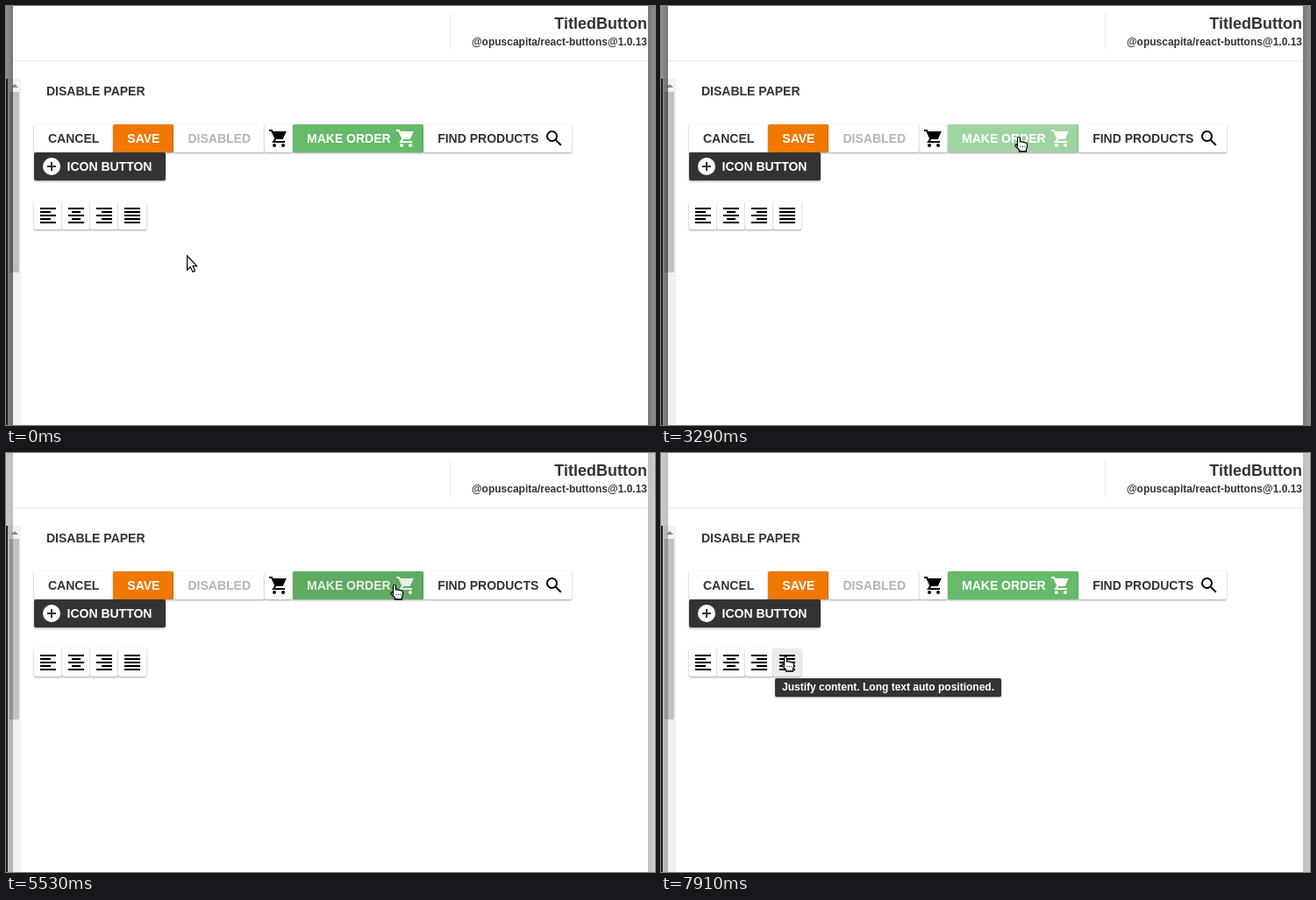
An HTML page that plays this animation: 740 by 478 pixels, repeating every 8 s.

```html
<!DOCTYPE html>
<html lang="en">
<head>
<meta charset="utf-8">
<title>TitledButton</title>
<style>
html, body { margin: 0; width: 100%; height: 100%; overflow: hidden; background: #fff; }
#stage {
  position: absolute; left: 0; top: 0; width: 740px; height: 478px; overflow: hidden;
  background: #fff; color: #333;
  font: bold 14px/32px "Liberation Sans", Arial, sans-serif; white-space: nowrap;
}
#stage > * { position: absolute; }
.head { right: 9px; text-align: right; }
.line { background: #eaeaea; }
.row { left: 32px; height: 32px; display: flex; }
.btn {
  position: relative; display: flex; gap: 5.5px; border-radius: 2px; background: #fff;
  box-shadow: 0 1px 3px rgba(0, 0, 0, .14), 0 1px 2px rgba(0, 0, 0, .26);
}
.btn svg { margin: 4px 0; width: 24px; height: 24px; fill: currentColor; stroke: currentColor; stroke-width: 0; }
.btn .o { fill: none; stroke-width: 2; }
.veil { position: absolute; inset: 0; border-radius: 2px; }
.side { top: 0; width: 8px; height: 478px; }
#tip {
  left: 130px; top: 257px; width: 258px; height: 21px; border-radius: 2px;
  background: #333; color: #fff; font-size: 12px; line-height: 20px; text-indent: 8px;
  box-shadow: 0 1px 2px rgba(0, 0, 0, .4);
}
#arrow, #hand { left: 0; top: 0; overflow: visible; stroke: #000; stroke-width: 1.2; fill: #fff; }
</style>
</head>
<body>
<div id="stage">
  <div class="head" style="top:4px;font-size:18px">TitledButton</div>
  <div class="head" style="top:25px;font-size:12px">@opuscapita/react-buttons@1.0.13</div>
  <div class="line" style="left:506px;top:8px;width:1px;height:42px"></div>
  <div class="line" style="left:8px;top:62px;width:724px;height:1px"></div>
  <div style="left:46px;top:81px">DISABLE PAPER</div>

  <div style="left:2px;top:83px;width:15px;height:395px;background:#f1f1f1"></div>
  <div style="left:4px;top:98px;width:11px;height:206px;background:#c1c1c1"></div>
  <svg style="left:6px;top:89px" width="8" height="5"><path d="M0 4L4 0L8 4Z" fill="#8a8a8a"/></svg>
  <div class="side" style="left:0"></div>
  <div class="side" style="left:732px"></div>
  <div style="left:0;top:83px;width:2px;height:395px;background:#1c1f24"></div>

  <div class="row" style="top:135px"></div>
  <div class="row" style="top:167px"></div>
  <div class="row" style="top:223px"></div>
  <div id="tip">Justify content. Long text auto positioned.</div>

  <svg id="arrow" width="14" height="21">
    <path d="M.6 1V17.2L4.3 13.7L6.9 19.3L9.5 18.1L7 12.6H11.7Z"/>
  </svg>
  <svg id="hand" width="16" height="18">
    <path d="M3.5 10.5V2a1.5 1.5 0 0 1 3 0V6q1.5-.8 2.6.3q1.5-.6 2.5.6q2.6-.3 2.9 1.6V12L13.5 14V17H5.5V15L1 10.6q-.3-1.9 1.3-1.8z"/>
    <path d="M6.5 11.5h1M9 11.5h1M11.5 11.5h1M5 16.8h9" fill="none"/>
  </svg>
</div>
<script>
const LOOP = 8000, STEP = 70, FOCUS_TIME = 4130;
const $ = id => document.getElementById(id);

// five text lines; every second one is short and starts at x
const lines = (x, w) => [0, 1, 2, 3, 4].map(i =>
  `<rect x="${i % 2 ? x : 3}" y="${3 + i * 4}" width="${i % 2 ? w : 18}" height="2"/>`).join("");

const icons = {
  cart: `<path d="M5 4H20.8L16.7 13H7.5z"/><path class="o" d="M1 3H4L8.4 12.4L6 16H19"/>
    <circle cx="7" cy="20" r="2"/><circle cx="17" cy="20" r="2"/>`,
  search: '<circle class="o" cx="9.5" cy="9.5" r="5.5"/><path class="o" d="M13.6 13.6L19.8 19.8"/>',
  add: '<circle cx="12" cy="12" r="10"/><path class="o" d="M7 12H17M12 7V17" style="stroke:#333"/>',
  left: lines(3, 12),
  center: lines(7, 10),
  right: lines(9, 12),
  justify: lines(3, 18)
};

// focus..blur: tinted; press..release: tinted more
const rows = [
  [
    { text: "CANCEL" },
    { text: "SAVE", bg: "#f07800", ink: "#fff" },
    { text: "DISABLED", ink: "#b5b5b5", off: true },
    { icon: "cart" },
    { text: "MAKE ORDER", icon: "cart", bg: "#66bb6a", ink: "#fff",
      focus: 5250, press: 5320, release: 5530, blur: 5880 },
    { text: "FIND PRODUCTS", icon: "search",
      focus: FOCUS_TIME, press: 4410, release: 4550, blur: 5250 }
  ],
  [{ text: "ICON BUTTON", icon: "add", first: true, bg: "#333", ink: "#fff",
     focus: 6650, press: 6650, release: 6790, blur: 7700 }],
  [
    { icon: "left" }, { icon: "center" }, { icon: "right" },
    { icon: "justify", focus: 7700, press: 7770, release: 7910, blur: LOOP }
  ]
];
const buttons = rows.flat();

rows.forEach((row, i) => {
  const rowEl = document.querySelectorAll(".row")[i];
  for (const b of row) {
    const el = document.createElement("div");
    const label = b.text ? `<span style="color:${b.ink || "#333"}">${b.text}</span>` : "";
    const icon = b.icon ? `<svg viewBox="0 0 24 24">${icons[b.icon]}</svg>` : "";
    const side = b.text ? 16 : 4;
    const padding = !label || !icon ? [side, side] : b.first ? [16, 8] : [8, 16];
    el.className = "btn";
    el.style.cssText = `padding:0 ${padding[0]}px 0 ${padding[1]}px;` +
      `background:${b.bg || "#fff"};color:${b.ink || "#000"}`;
    if (label && icon && !b.first) el.style.padding = "0 8px 0 16px";
    el.innerHTML = (b.first ? icon + label : label + icon) + '<div class="veil"></div>';
    rowEl.append(el);
    b.veil = el.lastChild;
    b.el = el;
  }
});
for (const b of buttons) b.box = b.el.getBoundingClientRect();

// pointer glides, each curving through an optional control point
const start = [206, 284];
const glides = [
  { from: 560, until: 980, to: [-14, 304], via: [150, 298] },
  { from: 980, until: 1400, to: [-14, 2] },
  { from: 1400, until: 2240, to: [138, 147], via: [14, 121] },
  { from: 2240, until: 3080, to: [395, 151], via: [266, 190] },
  { from: 3080, until: 3290, to: [409, 149] },
  { from: 3290, until: 3850, to: [520, 152] },
  { from: 4690, until: 4970, to: [444, 150] },
  { from: 5740, until: 6510, to: [172, 187], via: [200, 220] },
  { from: 6930, until: 7210, to: [133, 226] },
  { from: 7350, until: 7560, to: [143, 232] }
];

function pointer(t) {
  let pos = start;
  for (const { from, until, to, via } of glides) {
    if (t <= from) break;
    const k = Math.min(1, (t - from) / (until - from));
    pos = pos.map((a, i) => {
      const c = via ? via[i] : (a + to[i]) / 2;
      return (1 - k) ** 2 * a + 2 * k * (1 - k) * c + k * k * to[i];
    });
  }
  return pos;
}

function inside({ off, box }, t) {
  const [x, y] = pointer(t);
  return !off && x >= box.left && x < box.right && y >= box.top && y < box.bottom;
}

function draw(now) {
  const t = Math.floor(now % LOOP / STEP) * STEP;
  let over = false;
  for (const b of buttons) {
    const here = inside(b, t);
    over = over || here;
    const hover = (here + inside(b, t - STEP)) / 2;
    const focused = t >= b.focus && t < b.blur;
    const pressed = t >= b.press && t < b.release;
    b.veil.style.background = focused
      ? `rgba(0,0,0,${pressed ? .14 : .08})`
      : `rgba(255,255,255,${.38 * hover})`;
  }

  const [x, y] = pointer(t).map(Math.round);
  $("arrow").style.display = over ? "none" : "block";
  $("hand").style.display = over ? "block" : "none";
  $("arrow").style.transform = `translate(${x}px,${y}px)`;
  $("hand").style.transform = `translate(${x - 6}px,${y}px)`;
  $("tip").style.opacity = Math.max(0, Math.min(1, (t - 7070) / 140));

  const dark = t < FOCUS_TIME ? .44 : .21;
  document.querySelectorAll(".side").forEach((el, i) => {
    el.style.background =
      `linear-gradient(${i ? 270 : 90}deg, rgba(0,0,0,${dark}), rgba(0,0,0,${dark * 1.2}))`;
  });
}

function tick() {
  draw(performance.now());
  requestAnimationFrame(tick);
}
tick();
</script>
</body>
</html>
```
